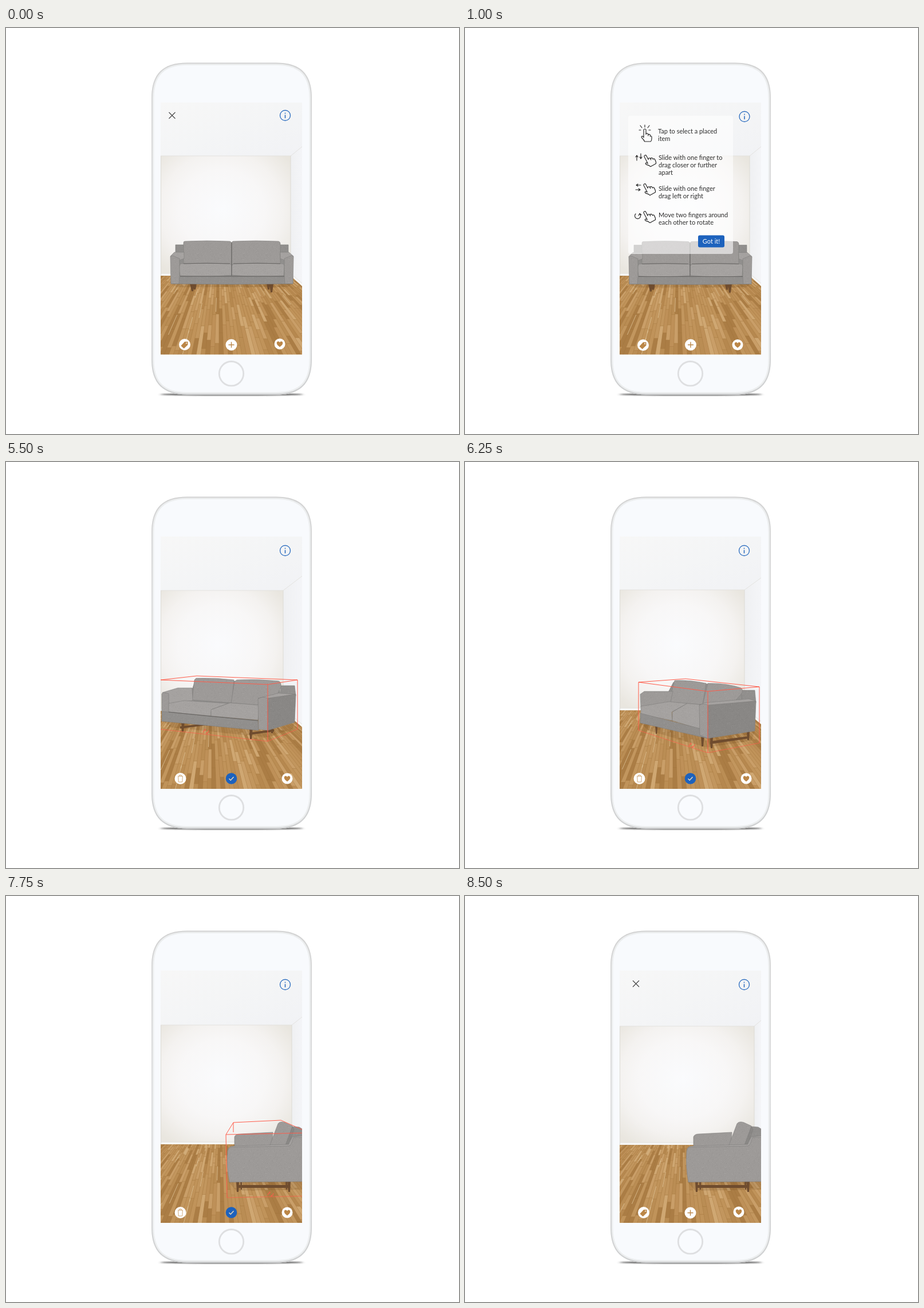
Animation of 791 by 708 pixels, one loop 9500 ms. Source, as an HTML page:

```html
<!DOCTYPE html>
<html lang="en">
<head>
<meta charset="utf-8">
<title>Furniture placement</title>
<style>
html, body { margin: 0; width: 100%; height: 100%; overflow: hidden; background: #fff; }
svg { display: block; width: 100vw; height: 100vh; }
text { font: 11px Lato, "Open Sans", sans-serif; fill: #2b2b2b; }
#reel { animation: reel 9.5s step-end infinite; }
@keyframes reel {
  0% { transform: translateX(0); }
  10.526% { transform: translateX(-247px); }
  47.368% { transform: translateX(-494px); }
  57.894% { transform: translateX(-741px); }
  65.789% { transform: translateX(-988px); }
  73.684% { transform: translateX(-1235px); }
  81.578% { transform: translateX(-1482px); }
  89.473% { transform: translateX(-1729px); }
}
.line { fill: none; stroke: #252525; stroke-width: 1.15; stroke-linecap: round; stroke-linejoin: round; }
.cage { fill: none; stroke: #ff5c4a; stroke-width: 1; }
.seam { fill: none; stroke: #676563; stroke-width: 1.1; }
.wood { fill: #6f4c2e; }
.tan { fill: #bb8647; }
</style>
</head>
<body>
<svg viewBox="0 0 791 708" preserveAspectRatio="none">
  <defs>
    <clipPath id="screen"><rect x="270" y="130" width="247" height="439.300"/></clipPath>
    <path id="case" d="M254 122C254 80 274 60.500 316 60.500H472C514 60.500 534 80 534 122V578C534 620 514 639.500 472 639.500H316C274 639.500 254 620 254 578Z"/>
    <clipPath id="body"><use href="#case"/></clipPath>
    <filter id="soft" x="-10%" y="-200%" width="120%" height="500%"><feGaussianBlur stdDeviation="2 1"/></filter>
    <linearGradient id="ceil" x1="0" y1="0" x2="1" y2="1">
      <stop offset="0" stop-color="#f7f7f7"/><stop offset=".5" stop-color="#f4f5f6"/><stop offset="1" stop-color="#f1f2f5"/>
    </linearGradient>
    <radialGradient id="wall" cx=".47" cy=".45" r=".66">
      <stop offset="0" stop-color="#fafbfd"/><stop offset=".5" stop-color="#f8f7f7"/>
      <stop offset=".72" stop-color="#f4f2f0"/><stop offset="1" stop-color="#e9e6df"/>
    </radialGradient>
    <linearGradient id="side"><stop offset="0" stop-color="#eff0f2"/><stop offset="1" stop-color="#f4f5f8"/></linearGradient>
    <linearGradient id="rim" x1="0" y1="0" x2="0" y2="1">
      <stop offset="0" stop-color="#d4d4d4"/><stop offset=".5" stop-color="#dcddde"/><stop offset="1" stop-color="#cfd0d1"/>
    </linearGradient>
    <g id="floor"></g>

    <path id="hand" class="line" d="M-2 15V2a2 2 0 0 1 4 0V9.500a1.900 1.900 0 0 1 3.800 .2V12V11a1.800 1.800 0 0 1 3.600 .3V13a1.500 1.500 0 0 1 2.600 .6V17q0 3-1.700 5H-.5q-.8-3-4.800-6.500q-1.500-3 1.300-3L-2 15"/>
    <path id="close" d="M-5.500-5.500L5.500 5.500M5.500-5.500L-5.500 5.500" stroke="#4a4a4a" stroke-width="1.200"/>
    <g id="info" fill="none" stroke="#2f6fc0" stroke-width="1.350">
      <circle r="9"/><path d="M0-1V4.800M0-4.800V-3" stroke-width="1.600"/>
    </g>
    <g id="tag"><circle r="10" fill="#fff"/>
      <path class="tan" d="M-6 1.500L0-5H5.500V.5L-.8 6.500Q-1.500 7-2.200 6.300L-6 2.700Q-6.500 2-6 1.500Z"/>
      <circle cx="3" cy="-2.500" r="1" fill="#fff"/></g>
    <g id="plus"><circle r="10" fill="#fff"/><path d="M-5 0H5M0-5V5" stroke="#bb8647" stroke-width="1.400"/></g>
    <g id="heart"><circle r="9.500" fill="#fff"/>
      <path class="tan" d="M0 5.200C-3 2.800-5.300 1-5.300-1.500C-5.300-5-1.200-5.300 0-2.500C1.200-5.300 5.300-5 5.300-1.500C5.300 1 3 2.800 0 5.200Z"/></g>
    <g id="check"><circle r="9.800" fill="#1d62bd"/><path d="M-4 .3L-1.300 3L4-2.700" fill="none" stroke="#e9d9bd" stroke-width="1.500"/></g>
    <g id="trash"><circle r="10" fill="#fff"/>
      <path d="M-4.500-4H4.500M-1.800-4V-6H1.800V-4M-3.800-4L-3.300 6H3.300L3.800-4" fill="none" stroke="#cfa878"/></g>
    <g id="spin"><path class="cage" d="M-5 2Q-5-2.500-1-3M-2.500-4.500L-.5-3L-2.500-1M5-2Q5 2.500 1 3M2.500 1L.5 3L2.500 4.500"/></g>
  </defs>

  <rect width="791" height="708" fill="#fff"/>
  <ellipse cx="394" cy="639" rx="126" ry="1.800" fill="#3a3a3a" filter="url(#soft)"/>
  <g clip-path="url(#body)">
    <use href="#case" fill="#f8fafd" stroke="#eceeef" stroke-width="9"/>
    <use href="#case" fill="none" stroke="url(#rim)" stroke-width="4"/>
  </g>
  <circle cx="393.500" cy="602.700" r="21.200" fill="#f9fbfe" stroke="#dedfe1" stroke-width="2.800"/>
  <g clip-path="url(#screen)"><g id="reel"></g></g>
</svg>

<script>
const get = id => document.getElementById(id);
let seed = 7;
const rnd = () => (seed = seed * 16807 % 2147483647) / 2147483647;

// Planks receding to one vanishing point
function planks() {
  const tones = ['#c0935a', '#b6884f', '#c99e68', '#ba8d54', '#cfa772', '#c2965e', '#ab7d45', '#be9058'];
  const paths = tones.map(() => '');
  const at = (x, z) => (372 + x / z).toFixed(1) + ' ' + (334 + 236 / z).toFixed(1);
  const w = 8;
  for (let c = -42; c < 56; c++) {
    for (let z = .95 - rnd() * .3; z < 2.65;) {
      const end = z + .14 + rnd() * .26, x = c * w;
      paths[rnd() * tones.length | 0] += `M${at(x, z)}L${at(x + w, z)} ${at(x + w, end)} ${at(x, end)}Z`;
      z = end;
    }
  }
  let seams = '';
  for (let i = 0; i < 34; i++) {
    const x = (Math.floor(rnd() * 90) - 40) * w, z = .95 + rnd() * 1.3;
    seams += `M${at(x, z)}L${at(x, z + .12 + rnd() * .15)}`;
  }
  return '<rect x="230" y="415" width="330" height="180" fill="#bd9058"/>' +
    paths.map((d, i) => `<path d="${d}" fill="${tones[i]}" stroke="#9d7039" stroke-width=".25"/>`).join('') +
    `<path d="${seams}" stroke="#e8cfa4" stroke-width=".7"/>`;
}

// Woven cloth in four shades
const cloth = { a: '#a5a2a0', b: '#9d9a98', c: '#918f8d', d: '#898785' };
function weave([id, color]) {
  let dots = '';
  for (let i = 0; i < 200; i++)
    dots += `<rect x="${rnd() * 40 | 0}" y="${rnd() * 40 | 0}" width="1" height="1" fill="${rnd() < .5 ? '#fff' : '#333'}" opacity=".06"/>`;
  return `<pattern id="${id}" width="40" height="40" patternUnits="userSpaceOnUse"><rect width="40" height="40" fill="${color}"/>${dots}</pattern>`;
}

const part = (shade, d) => `<path d="M${d}Z" fill="url(#${shade})" stroke="#7f7d7b" stroke-width=".6" stroke-linejoin="round"/>`;
const wood = d => `<path class="wood" d="${d}"/>`;
const seam = d => `<path class="seam" d="${d}"/>`;
const shadow = d => `<path d="M${d}Z" fill="#5a3a18" opacity=".16"/>`;

const sofas = {
  front:
    shadow('290 446H499L492 452H298') +
    wood('M321 446H329L327 459H324ZM327 446H333L331 456H328ZM455 446H461L460 456H457ZM460 446H467L465 461H462Z') +
    part('c', '296 378H493V435H296') +
    part('b', '312 372Q351 370 391 372Q394 373 394 376V412H310V375Q310 372 312 372') +
    part('b', '396 372Q436 370 476 372Q479 373 479 376V412H394V376Q394 373 396 372') +
    part('a', '305 411Q350 409 391 411Q394 412 394 416V431Q350 435 304 432Q302 424 303 414') +
    part('a', '397 411Q440 409 483 411Q486 412 486 416L485 432Q440 435 394 431V415') +
    part('c', '288 433H501V446Q394 448 288 446') +
    part('a', '287 398L294 391H311V402L303 405H289') +
    part('a', '502 398L494 391H479V402L486 405H500') +
    part('b', '287 399Q288 397 291 397L303 402V434L302 446H288') +
    part('b', '502 399Q501 397 498 397L486 402V434L487 446H501') +
    seam('M394 374V432M304 433H486M310 411Q350 409.500 391 411M397 411Q440 409.500 479 411'),
  turned:
    shadow('274 452L457 469 504 455 500 466 455 480 290 463') +
    wood('M306 453H312L310 470H307ZM304 461L350 456V459L304 465ZM348 452H352V460H349ZM425 464H431L429 483H426ZM425 472L468 466V470L425 476ZM462 463H467L466 473H463Z') +
    part('c', '480 390H504L506 408H478') +
    part('c', '330 382L398 382 478 386 478 410 445 448 290 434 326 394') +
    part('b', '332 377Q365 376 398 380L394 420 325 415 329 380') +
    part('b', '403 380Q440 378 476 382Q481 384 480 392L474 405 443 424 393 420 399 383') +
    part('a', '273 402L300 394H325L326 416 284 424') +
    part('b', '272 404Q276 401 284 404L285 447 272 452') +
    part('a', '284 421L311 416 388 421 360 431Q357 435 358 443L284 436') +
    part('a', '358 432L391 420 443 424 440 450 358 443') +
    part('c', '273 435L440 451 441 468 272 452') +
    part('a', '440 412L476 403 506 405 457 413') +
    part('b', '440 413Q448 408 457 412V468L441 466') +
    part('d', '457 412L506 405 504 454 457 468') +
    seam('M284 436L358 443.500 440 451'),
  corner:
    shadow('306 455L424 482 506 470 500 486 422 498 320 468') +
    wood('M332 457H337L335 474H333ZM412 474H418L416 496H413ZM428 480H433L432 499H429ZM428 487L496 478V482L428 492ZM492 470H497L496 485H493Z') +
    part('c', '478 398H506L508 420H478') +
    part('c', '364 384L422 387 482 396 484 418 412 440 340 430') +
    part('b', '366 381Q394 380 421 386L415 423 356 419') +
    part('b', '424 386Q455 385 482 394Q487 398 482 405L466 423 415 423') +
    part('b', '306 405L313 400H363L358 423 307 428') +
    part('a', '307 426L356 418 388 421 361 436 362 451 307 440') +
    part('a', '362 436L388 421 424 424 411 466 362 451') +
    part('c', '306 438L411 465 424 482 306 455') +
    part('a', '409 424L418 420 496 413 508 417 424 425') +
    part('b', '409 424Q417 420 424 424V482L410 476') +
    part('d', '424 424L508 417 506 469 424 482'),
  profile:
    shadow('352 462L390 492 510 488 512 500 395 512 366 481') +
    wood('M366 468H370L369 483H367ZM381 480H385L384 492H382ZM393 489H398L397 509H394ZM478 486H483L482 505H479ZM393 495L483 492V498L393 501Z') +
    part('c', '484 404L494 408 512 411 511 432H474') +
    part('b', '427 388Q429 385 434 387L483 399Q488 402 486 407L475 430 416 428') +
    part('d', '486 402L490 406 480 430 472 429') +
    part('b', '350 411Q352 406 360 406L420 404 417 429 351 435') +
    part('a', '352 434Q370 427 416 427L389 434V466L384 475 351 448') +
    part('c', '351 444L384 472 390 491 350 462') +
    part('a', '387 433Q390 428 397 428L487 427 495 411 512 411 511 433') +
    part('b', '387 434Q389 430 395 430L506 429Q511 429 511 434L510 488 390 491Q387 465 387 434'),
  edge:
    shadow('388 498H520V512L402 514') +
    wood('M402 497H407L406 516H403ZM409 499H412V512H410ZM488 498H491V512H489ZM491 497H497L496 516H493ZM403 504H495V509H403Z') +
    part('c', '488 401L512 403 520 408V422H499L491 435 470 433') +
    part('b', '399 420Q401 415 408 415L466 412 464 437 399 438') +
    part('b', '461 434L475 397Q479 392 487 395L500 401 491 435') +
    part('d', '500 402L503 407 493 435 488 434') +
    part('a', '387 442Q390 436 398 436L494 433 500 420 520 418V444') +
    part('b', '387 444Q389 438 396 438L493 436Q497 436 499 430L502 421H520V498L390 499Q385 474 387 444')
};

function room([cx, top, base, topEdge, baseEdge]) {
  return `<use href="#floor" x="${cx - 497}" y="${base - 432}"/>
    <path d="M270 130H517V${topEdge}L${cx} ${top}H270Z" fill="url(#ceil)"/>
    <rect x="270" y="${top}" width="${cx - 270}" height="${base - top}" fill="url(#wall)"/>
    <path d="M${cx} ${top}L517 ${topEdge}V${baseEdge}L${cx} ${base}Z" fill="url(#side)"/>
    <path d="M270 ${base - 4}H${cx}L517 ${baseEdge - 5}V${baseEdge}L${cx} ${base}H270Z" fill="#f6f6f5"/>
    <path d="M270 ${top}H${cx}L517 ${topEdge}M270 ${base - 4}H${cx}L517 ${baseEdge - 5}" fill="none" stroke="#dfdeda" stroke-width=".8"/>
    <path d="M${cx} ${top}V${base}M270.500 ${top}V${base}" stroke="#dddbd5"/>`;
}

const icon = (id, x, y) => `<use href="#${id}" x="${x}" y="${y}"/>`;
const cage = (strong, faint, x, y) =>
  `<path class="cage" d="${strong}"/><path class="cage" d="${faint}" opacity=".7"/>` + icon('spin', x, y);
const lines = (x, y, ...rows) => rows.map((t, i) => `<text x="${x}" y="${y + 13 * i}">${t}</text>`).join('');
const hand = (x, y, turn) => `<use href="#hand" transform="translate(${x} ${y}) rotate(${turn})"/>`;

const help = `<rect x="285" y="153" width="183" height="241" rx="4" fill="#fff" opacity=".6"/>` +
  lines(337, 183.5, 'Tap to select a placed', 'item') +
  lines(338, 229.5, 'Slide with one finger to', 'drag closer or further', 'apart') +
  lines(338, 284, 'Slide with one finger', 'drag left or right') +
  lines(338, 330, 'Move two fingers around', 'each other to rotate') +
  hand(314, 176, 0) + hand(314, 222, -28) + hand(313, 272, -28) + hand(313, 320, -28) +
  `<path class="line" d="M314 173V169M309 174L306 170M319 174L322 170M307 178H304M321 178H324
    M300 231V222M298 225L300 222 302 225M307 219V228M305 225L307 228 309 225
    M307 274H299M302 272L299 274 302 276M298 282H306M303 280L306 282 303 284
    M298 324A5 5 0 1 0 305 324M303 327L305 323.500 308 326"/>
  <rect x="407" y="361.500" width="46" height="21" rx="3" fill="#1d62bd"/>
  <text x="430" y="376" text-anchor="middle" style="fill:#fff">Got it!</text>`;

const browse = (x, y) => icon('close', x, y) + icon('tag', 312, 552) + icon('plus', 393.5, 552.5) + icon('heart', 478, 551);
const edit = icon('info', 487.5, 154.5) + icon('trash', 304.5, 552) + icon('check', 393.5, 552) + icon('heart', 491, 552);
const straight = [497, 223, 432, 207, 450];

const scenes = [
  room(straight) + sofas.front + icon('info', 487.5, 152.5) + browse(290, 152.5),
  room(straight) + `<g transform="translate(-1 .5)">${sofas.front}</g>` + help +
    icon('info', 488, 154.5) + icon('tag', 311, 553) + icon('plus', 394, 552.5) + icon('heart', 476, 552.5),
  room(straight) + `<g transform="translate(0 1)">${sofas.front}</g>` +
    cage('M296 370H492L504 386 285 385ZM285 385L286 440M504 386L503 440M296 370V379M492 370V379',
      'M286 440V466H503V440', 405, 461) +
    icon('info', 487.5, 152.5) + icon('check', 394, 552.5),
  room([484, 224, 434, 199, 462]) + sofas.turned +
    cage('M270 380L333 373 509 380 457 388ZM457 388V487M509 380V466', 'M270 466L457 487 509 466', 349, 470) + edit,
  room([488, 223, 433, 202, 457]) + sofas.corner +
    cage('M303 384L385 378 514 392 424 400ZM303 384V468M424 400V507M514 392V490', 'M303 468L424 507 514 490', 396, 494) + edit,
  room([491, 222, 433, 205, 453]) + sofas.profile +
    cage('M349 386L428 382 516.500 408 388 411ZM349 386V473M388 411L390 519M516.500 408V516',
      'M349 473L390 519 400 522 516 516', 452, 512) + edit,
  room([499, 225, 433, 211, 447]) + sofas.edge +
    cage('M397 395L480 391 530 413 384 416ZM384 416L386 526M397 395V412', 'M386 526L530 523', 462, 520) + edit,
  room([505, 227, 434, 217, 444]) + sofas.edge + icon('info', 487.5, 154.5) + browse(298.5, 153)
];

get('floor').innerHTML = planks();
document.querySelector('defs').insertAdjacentHTML('beforeend', Object.entries(cloth).map(weave).join(''));
get('reel').innerHTML = scenes.map((s, i) =>
  `<g transform="translate(${247 * i})"><g clip-path="url(#screen)">${s}</g></g>`).join('');
</script>
</body>
</html>
```
